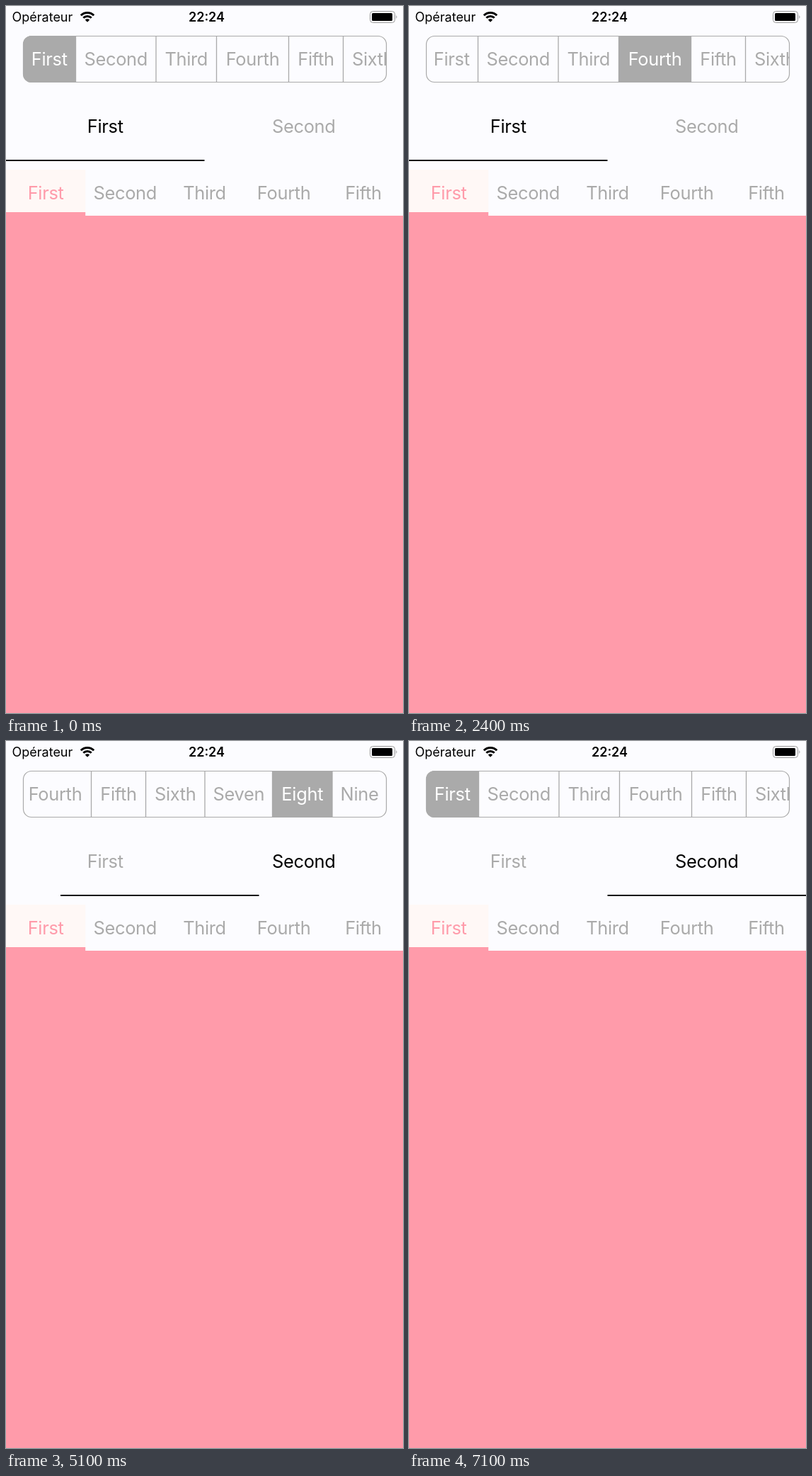
Animation, 561 px wide and 998 px high, one loop 8 s. Source, as an HTML page:

```html
<!DOCTYPE html>
<html lang="en">
<head>
<meta charset="utf-8">
<title>Segmented controls</title>
<style>
  html, body { margin: 0; width: 100%; height: 100%; overflow: hidden; background: #fcfcff; }
  svg { display: block; width: 561px; height: 998px; }
  text { font: 25.4px Inter, sans-serif; letter-spacing: -.3px; text-anchor: middle; fill: #aaa; }
  .status { font-size: 18px; letter-spacing: 0; fill: #000; }
  .segment rect { fill: none; }
  .segment.on rect { fill: #aaa; }
  .segment.on text { fill: #fff; }
  .segment path { stroke: #aaa; stroke-width: 1.3; }
  .tab.on { fill: #000; }
  .pink { fill: #ff9baa; }
</style>
</head>
<body>
<svg viewBox="0 0 561 998">
  <defs>
    <clipPath id="frame"><rect x="24" y="42" width="514" height="66" rx="12"/></clipPath>
  </defs>
  <rect width="561" height="998" fill="#fcfcff"/>

  <text class="status" x="8.5" y="22" style="text-anchor:start">Opérateur</text>
  <text class="status" x="283.5" y="22" style="font-weight:600">22:24</text>
  <g fill="none" stroke="#000" stroke-width="3">
    <path d="M105.8 13.3a13 13 0 0 1 18.4 0M109.3 16.8a8 8 0 0 1 11.4 0"/>
    <path d="M115 22.8l-3.2-3.2a4.5 4.5 0 0 1 6.4 0z" fill="#000" stroke="none"/>
  </g>
  <rect x="514.5" y="7.5" width="35" height="16" rx="4" fill="none" stroke="#999"/>
  <rect x="517" y="10" width="29" height="11" rx="1.5"/>
  <path d="M551.3 13q2.2 2.5 0 5z" fill="#999"/>

  <g clip-path="url(#frame)"><g id="strip"></g></g>
  <rect x="24.5" y="42.5" width="513" height="65" rx="11.5" fill="none" stroke="#aaa" stroke-width="1.2"/>

  <g id="tabs"></g>
  <rect id="underline" y="217" width="280.5" height="1.9"/>

  <rect y="231" width="112.2" height="60" fill="#fff8f6"/>
  <g id="pages"></g>
  <path class="pink" d="M0 291H112.2V296H561V998H0z"/>
</svg>
<script>
const DURATION = 8000;
const names = ['First', 'Second', 'Third', 'Fourth', 'Fifth', 'Sixth', 'Seven', 'Eight', 'Nine'];
const edges = [24, 98.5, 212, 297.5, 399.5, 476.5, 560, 655.5, 740, 817];

// Steps are [time in ms, value], each held until the next one.
const selection = [[0, 0], [500, 1], [1300, 2], [2400, 3], [3500, 7], [7000, 0]];
const scroll = [[0, 0], [2400, 1], [2500, 125], [2700, 279], [6000, 188], [6100, 0]];
const tab = [[0, 0], [5100, 1]];
const slide = [[0, 0], [5100, 77], [5300, 180], [5400, 255], [5500, 280.5]];

const byId = id => document.getElementById(id);
const valueAt = (steps, time) => steps.findLast(([start]) => start <= time)[1];
const label = (name, x, y, className = '') =>
  `<text class="${className}" x="${x}" y="${y}">${name}</text>`;
const select = (items, index) =>
  items.forEach((item, i) => item.classList.toggle('on', i === index));

byId('strip').innerHTML = names.map((name, i) => {
  const left = edges[i], right = edges[i + 1];
  return `<g class="segment">
    <rect x="${left}" y="42" width="${right - left}" height="66"/>
    ${i ? `<path d="M${left} 42v66"/>` : ''}
    ${label(name, (left + right) / 2, 84.3)}
  </g>`;
}).join('');

byId('tabs').innerHTML = names.slice(0, 2)
  .map((name, i) => label(name, 140.25 + i * 280.5, 178.6, 'tab')).join('');

byId('pages').innerHTML = names.slice(0, 5)
  .map((name, i) => label(name, 56.1 + i * 112.2, 272.9, i ? '' : 'pink')).join('');

const segments = [...byId('strip').children];
const tabs = [...byId('tabs').children];

function draw(time) {
  select(segments, valueAt(selection, time));
  select(tabs, valueAt(tab, time));
  byId('strip').setAttribute('transform', `translate(${-valueAt(scroll, time)})`);
  byId('underline').setAttribute('x', valueAt(slide, time));
}

const start = performance.now();
function tick() {
  draw((performance.now() - start) % DURATION);
  requestAnimationFrame(tick);
}
tick();
</script>
</body>
</html>
```
